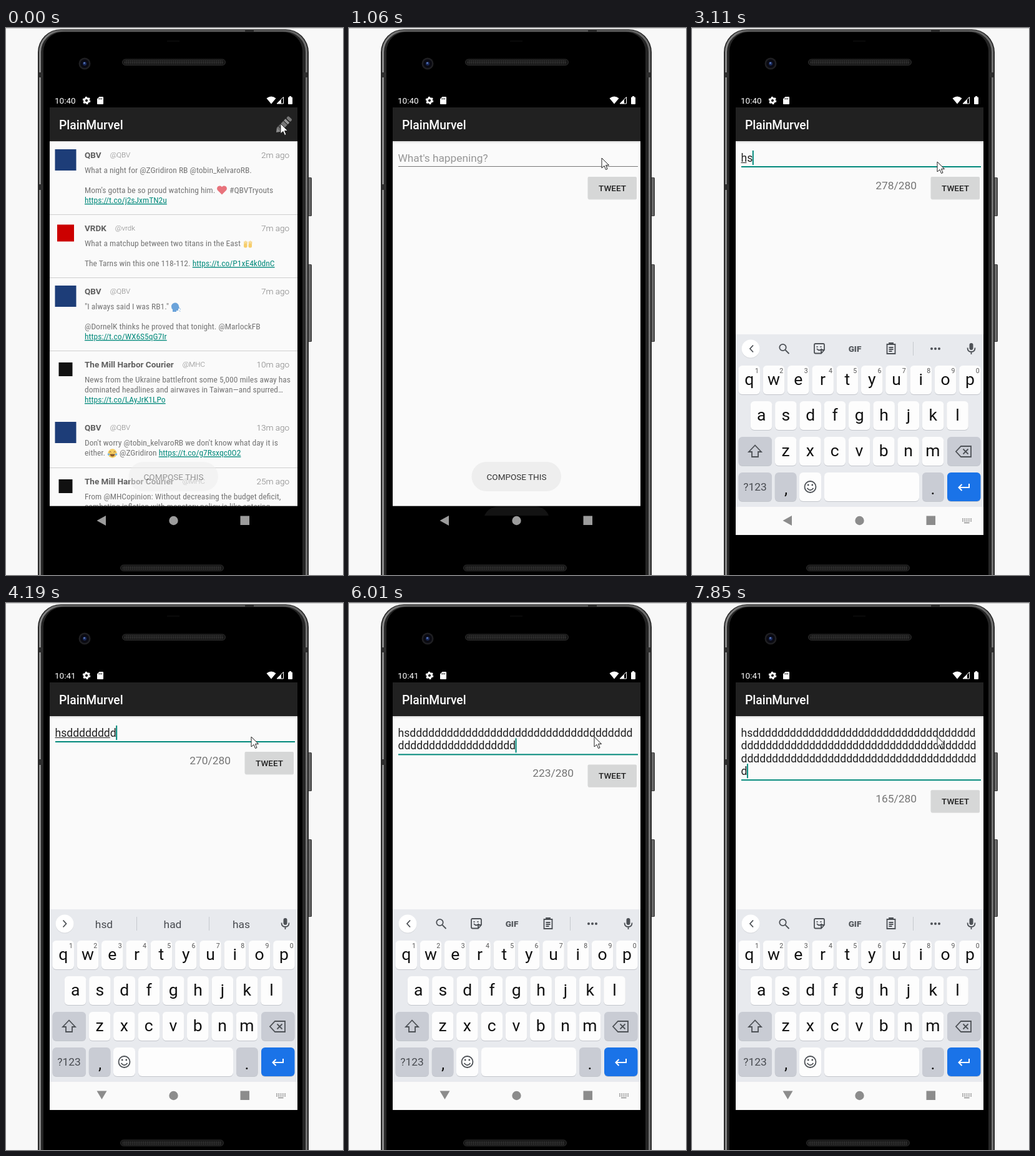
Write an HTML page that moves like this. It is 540 px wide and 875 px high and loops after 8 s.

```html
<!DOCTYPE html>
<html lang="en">
<head>
<meta charset="utf-8">
<title>Compose screen</title>
<style>
html, body { margin: 0; width: 100%; height: 100%; overflow: hidden; background: #f8f8f8; }
svg { display: block; width: 540px; height: 875px; }
text { font-family: Roboto, "Noto Sans", sans-serif; font-size: 13.52px; fill: #757575; }
.name { font-weight: 700; fill: #5f5f5f; }
.handle { font-weight: 300; font-size: 11.6px; fill: #858585; }
.ago { font-weight: 300; fill: #808080; text-anchor: end; }
.body { font-family: "Roboto Condensed", Roboto, sans-serif; font-stretch: 75%; font-variation-settings: "wdth" 75; }
.wide .body { font-size: 12.4px; letter-spacing: -.22px; }
.link { fill: #00897b; text-decoration: underline; }
.title { font-size: 19.3px; font-weight: 500; fill: #fff; }
.clock { fill: #fff; }
.hint { font-size: 17.3px; fill: #969696; }
.typed { font-size: 17.6px; fill: #212121; }
.count { font-size: 17.4px; text-anchor: end; }
.button { font-weight: 500; fill: #212121; text-anchor: middle; }
.key { font-size: 26.5px; fill: #111; text-anchor: middle; }
.digit { font-size: 10.5px; fill: #555; text-anchor: middle; }
.word { font-size: 17.4px; fill: #484b50; text-anchor: middle; }
.gif { font-size: 13.5px; font-weight: 900; fill: #55595e; text-anchor: middle; }
.icon { fill: none; stroke: #4d5156; stroke-width: 1.8; }
</style>
</head>
<body>
<svg id="stage" viewBox="0 0 540 875"></svg>
<script>
const LOOP = 8000;
const LINE = 20.4;
const PER_LINE = 38;
const MAX_WORD = 48;

const text = (x, y, s, cls) => `<text x="${x}" y="${y}" class="${cls}">${s}</text>`;
const rect = (x, y, w, h, fill, r = 0, more = '') =>
  `<rect x="${x}" y="${y}" width="${w}" height="${h}" rx="${r}" fill="${fill}" ${more}/>`;
const circle = (x, y, r, fill, more = '') => `<circle cx="${x}" cy="${y}" r="${r}" fill="${fill}" ${more}/>`;
const path = (d, fill, more = '') => `<path d="${d}" fill="${fill}" ${more}/>`;
const icon = d => `<path class="icon" d="${d}"/>`;
const group = (id, inner, more = '') => `<g id="${id}" ${more}>${inner}</g>`;
const link = id => `<tspan class="link">https://t.co/${id}</tspan>`;

// Phone body
function phone() {
  const grille = (x, y) => rect(x, y, 165, 9.5, '#161616', 4.75, 'stroke="#2e2e2e"') +
    rect(x + 3, y + 2, 159, 6, 'url(#dots)', 3);
  const side = (y, h) => rect(484, y, 6, h, '#3a3a3a', 1.5) + rect(485, y + 1, 3.5, h - 2, '#6a6a6a');
  const band = (x, y, w, h) => rect(x, y, w, h, '#2e2e2e');
  return rect(0, 0, 540, 1, '#cdcdcd') + side(239, 62) + side(378, 124) +
    rect(51, 2, 434, 920, '#262626', 37) +
    rect(54.5, 4.5, 427, 920, 'none', 34, 'stroke="url(#rim)" stroke-width="3"') +
    rect(60, 6.5, 415, 920, '#000', 31) +
    band(383, 2, 14, 4) + band(52, 71, 7, 8) + band(477, 71, 7, 8) + band(52, 250, 7, 9) +
    rect(258, 20.5, 20, 1, '#151515') + grille(186.5, 50) + grille(183.5, 859) +
    circle(126, 57, 9.5, '#1f1f22') + circle(126, 57, 7, '#0a0a12') +
    circle(126, 57, 3, '#1a2a5c') + circle(125.5, 56, 1.2, '#6d8fd0');
}

function statusBar() {
  return `<text id="clock" x="78" y="121" class="clock">10:40</text>` +
    circle(129, 116, 3.5, 'none', 'stroke="#fff" stroke-width="3"') +
    circle(129, 116, 5.3, 'none', 'stroke="#fff" stroke-width="2" stroke-dasharray="2.8 2.75"') +
    path('M149.5 110H155a1 1 0 0 1 1 1v10a1 1 0 0 1-1 1h-8a1 1 0 0 1-1-1v-7.5z', '#fff') +
    path('M149 112v2.5m2.2-2.5v2.5m2.2-2.5v2.5', 'none', 'stroke="#000" stroke-width=".9"') +
    path('M417.5 112.5q7.5-6 15 0l-7.5 9z', '#fff') +
    path('M444.5 110.5v10.5h-10.5z', 'none', 'stroke="#fff"') + path('M441 114v7h-7z', '#fff') +
    rect(452, 110.5, 7, 11.5, '#fff', 1) + rect(454, 109, 3, 2, '#fff');
}

const toolbar = () => rect(70, 127, 397, 54, '#212121') + text(85, 162, 'PlainMurvel', 'title');

function pen() {
  return `<g transform="translate(433 167) rotate(-46)">` +
    path('M0 0l6-4.5v9z', '#8c8c8c') + rect(6, -4.5, 15, 9, '#777') +
    rect(9, -4.5, 2, 9, '#444') + rect(22, -4.5, 4, 9, '#999') + rect(27.5, -4.5, 5, 9, '#777', 2) + `</g>`;
}

// Timeline
const BRANDS = {
  league: { name: 'QBV', handle: '@QBV', color: '#1d3d78', size: 34 },
  sports: { name: 'VRDK', handle: '@vrdk', color: '#cc0000', size: 27 },
  paper: { name: 'The Mill Harbor Courier', handle: '@MHC', color: '#111', size: 22 }
};

const heart = path('M346 266.5l-7-7a4.2 4.2 0 0 1 7-5.3 4.2 4.2 0 0 1 7 5.3z', '#e8737c');
const hands = rect(381, 344.5, 5.5, 7, '#f6cd6b', 2.5) + rect(388.5, 344.5, 5.5, 7, '#f6cd6b', 2.5) +
  path('M382 345v-3m2 3v-4m2 4v-3m3.500 3v-3m2 3v-4m2 4v-3', 'none',
    'stroke="#f6cd6b" stroke-width="1.4" stroke-linecap="round"');
const speaker = path('M265 446a6 6 0 0 1 12-1l1 3.5-2 .5v3h-3v2h-6v-4q-2-1-2-4z', '#6ba3da') +
  path('M278.5 449l1.5 1m-2 2l1 1.5', 'none', 'stroke="#6ba3da"');
const joy = circle(170.5, 680.5, 7.2, '#f7cf62') + path('M166.5 681.5h8q-.5 4-4 4t-4-4z', '#8a5c30') +
  path('M165.5 678.5q1.5-2 3 0m4 0q1.5-2 3 0', 'none', 'stroke="#8a5c30"') +
  circle(164.5, 682, 1.8, '#7ab8e8') + circle(176.5, 682, 1.8, '#7ab8e8');

const POSTS = [
  [181, 'league', '2m', [
    [126, 0, 'What a night for @ZGridiron RB @tobin_kelvaroRB.'],
    [126, 2, "Mom's gotta be so proud watching him."], [358, 2, '#QBVTryouts'],
    [126, 3, link('j2sJxmTN2u')]], heart],
  [298, 'sports', '7m', [
    [126, 0, 'What a matchup between two titans in the East'],
    [126, 2, 'The Tarns win this one 118-112. ' + link('P1xE4k0dnC')]], hands],
  [399, 'league', '7m', [
    [126, 0, '"I always said I was RB1."'],
    [126, 2, '@DornelK thinks he proved that tonight. @MarlockFB'],
    [126, 3, link('WX6S5qG7Ir')]], speaker],
  [516, 'paper', '10m', [
    [126, 0, 'News from the Ukraine battlefront some 5,000 miles away has'],
    [126, 1, 'dominated headlines and airwaves in Taiwan—and spurred…'],
    [126, 2, link('LAyJrK1LPo')]], ''],
  [617, 'league', '13m', [
    [126, 0, "Don't worry @tobin_kelvaroRB we don't know what day it is"],
    [126, 1, 'either.'], [182, 1, '@ZGridiron ' + link('g7Rsxqc0O2')]], joy],
  [703, 'paper', '25m', [
    [126, 0, 'From @MHCopinion: Without decreasing the budget deficit,'],
    [126, 1, 'combating inflation with monetary policy is like entering']], '']
];
const DIVIDERS = [181, 298, 399, 516, 703];

function post([top, kind, ago, lines, emoji]) {
  const { name, handle, color, size } = BRANDS[kind];
  return rect(95.5 - size / 2, top + 30 - size / 2, size, size, color) +
    text(126, top + 26.8, `${name}<tspan class="handle" dx="14" dy="-1">${handle}</tspan>`, 'name') +
    text(454, top + 26.8, ago + ' ago', 'ago') +
    lines.map(([x, row, s]) => text(x, top + 51.4 + row * 15.85, s, 'body')).join('') + emoji;
}

const feed = () => rect(70, 181, 397, 584, '#fafafa') +
  DIVIDERS.map(y => rect(70, y, 397, 1, '#cfcfcf')).join('') +
  POSTS.map(post).join('') + toolbar() + pen();

// Compose screen
function compose() {
  const rows = [0, 1, 2, 3].map(i => `<text class="typed" x="78.5" y="${214 + i * LINE}"></text>`).join('');
  return rect(70, 181, 397, 584, '#fafafa') + rect(70, 181, 397, 4, 'url(#drop)') + toolbar() +
    text(78.5, 214, "What's happening?", 'hint').replace('<text', '<text id="hint"') +
    group('rows', rows) + path('', 'none', 'id="marks" stroke="#212121"') +
    rect(78, 196, 2, 23, '#00897b', 0, 'id="caret"') +
    group('below', rect(79, 221, 384, 1, '#777', 0, 'id="rule"') +
      `<text id="count" class="count" x="360" y="258"></text>` +
      rect(383, 239, 78, 35.5, '#000', 2, 'opacity=".12"') + rect(382.5, 238, 78.5, 35.5, '#d6d7d7', 2) +
      text(422, 261, 'TWEET', 'button'));
}

// Keyboard
function keyboard() {
  const box = (x, y, w, fill = '#fdfdfd') => rect(x, y + 1, w, 46, '#c3c6cc', 6) + rect(x, y, w, 46, fill, 6);
  const row = (letters, x0, y, digits) => [...letters].map((c, i) => {
    const x = x0 + i * 39.3;
    return box(x, y, 34.6) + text(x + 17.3, y + 31, c, 'key') +
      (digits ? text(x + 29.6, y + 12, (i + 1) % 10, 'digit') : '');
  }).join('');
  const gray = '#c9ccd4';
  const divider = x => rect(x, 502, 1, 22, '#c6c9ce');

  const tools = icon('M98 507.5l-5 5.5 5 5.5') +
    circle(145.5, 511, 5.2, 'none', 'class="icon"') + icon('M149.5 515l6 6') +
    icon('M198 505h12q2 0 2 2v8l-5 5.5h-9q-2 0-2-2v-11.5q0-2 2-2zM212 515h-5v5M200 513q4 5 8 0M200.5 509v2m6-2v2') +
    text(261, 517.8, 'GIF', 'gif') +
    icon('M312.5 506h13v15h-13zM316 506v-2h6v2M315.5 511h7m-7 3h7m-7 3h5') + divider(354) +
    [384, 390, 396].map(x => circle(x, 513, 2, '#4d5156')).join('');
  const words = icon('M91.5 507.5l5 5.5-5 5.5') + divider(209) + divider(325) +
    text(157, 520, 'hsd', 'word') + text(267, 520, 'had', 'word') + text(377, 520, 'has', 'word');

  return rect(70, 490, 397, 276, '#e8eaee') + circle(94, 514, 14.5, '#d4d6da') + circle(94, 513, 14.5, '#fff') +
    group('tools', tools) + group('words', words) +
    rect(444.5, 504, 6, 11, '#4d5156', 3) + icon('M441.5 511.5q0 6.5 6 6.5t6-6.5M447.5 518v4') +
    row('qwertyuiop', 74.4, 540, true) + row('asdfghjkl', 93.8, 597) + row('zxcvbnm', 132.8, 654) +
    box(74.5, 654, 53.5, gray) + icon('M101 667.5l-10 10.5h5v8h10v-8h5z') +
    box(409, 654, 53.5, gray) + icon('M431 669h16v17h-16l-8-8.5zM434.5 673.5l8 8m0-8l-8 8') +
    box(74.5, 711, 53.5, gray) + text(101, 740, '?123', 'word') +
    box(132.8, 711, 34.6, gray) + text(150.5, 746, ',', 'key') +
    box(172, 711, 35) + circle(189.5, 734, 9, 'none', 'class="icon"') + icon('M184.5 736q5 6.5 10 0') +
    circle(186.2, 731, 1.4, '#4d5156') + circle(192.8, 731, 1.4, '#4d5156') +
    box(212, 711, 152) + box(369, 711, 34.6, gray) + text(386, 746, '.', 'key') +
    box(409, 711, 53.5, '#1a73e8') +
    path('M444 729v6h-16.5m5-5l-5 5 5 5', 'none', 'stroke="#fff" stroke-width="2"');
}

function navBar() {
  const keys = [785.5, 788.5].map(y => `M433 ${y}h15`).join('');
  return rect(70, 764.7, 397, 46.3, '#000', 0, 'id="navBg"') +
    path('M217 780q7-14.500 22-14.500h60q15 0 21 14.500z', '#131313', 'id="glow"') +
    `<g id="nav"><path id="back"/><circle cx="268.5" cy="788" r="7.2"/>` +
    `<rect x="375.5" y="780.5" width="14.5" height="14.5"/></g>` +
    group('imeKey', path(keys, 'none', 'stroke-width="1.8" stroke-dasharray="1.8 1.5"') +
      path('M436 791.5h8.5', 'none', 'stroke-width="1.5"'), 'stroke="#8f8f8f"');
}

const stage = document.getElementById('stage');
stage.innerHTML = `<defs>
  <linearGradient id="rim" gradientUnits="userSpaceOnUse" x1="51" x2="485" y1="0" y2="0">
    <stop offset="0" stop-color="#8e8e8e"/><stop offset=".1" stop-color="#5a5a5a"/>
    <stop offset=".9" stop-color="#5a5a5a"/><stop offset="1" stop-color="#747474"/>
  </linearGradient>
  <linearGradient id="drop" x2="0" y2="1">
    <stop offset="0" stop-color="#000" stop-opacity=".12"/><stop offset="1" stop-color="#000" stop-opacity="0"/>
  </linearGradient>
  <pattern id="dots" width="3" height="3" patternUnits="userSpaceOnUse"><circle cx="1.5" cy="1.5" r="1" fill="#444"/></pattern>
  <clipPath id="screen"><rect x="70" y="127" width="397" height="638"/></clipPath>
  <clipPath id="panel"><rect x="70" y="490" width="397" height="276"/></clipPath>
</defs>` + phone() + statusBar() +
  `<g clip-path="url(#screen)">${group('feed', feed())}${group('compose', compose())}</g>` +
  navBar() + `<g clip-path="url(#panel)">${group('keyboard', keyboard())}</g>` +
  group('toast', rect(196.5, 694, 143.5, 47, '#eeeeee', 23.5) +
    `<text x="268.5" y="723" text-anchor="middle" style="fill:#333">COMPOSE THIS</text>`) +
  group('cursor', path('M0 0V16L4 12.5L6.5 18.5L9 17.5L6.5 11.5H11.5Z', '#fff', 'stroke="#222"'));

const $ = id => document.getElementById(id);
const set = (id, attrs) => { for (const k in attrs) $(id).setAttribute(k, attrs[k]); };
const show = (id, on) => set(id, { visibility: on ? 'visible' : 'hidden' });

// Use a smaller size when no condensed face is installed
const sample = stage.querySelector('.body');
const narrow = sample.getComputedTextLength();
sample.setAttribute('class', '');
if (narrow > sample.getComputedTextLength() * 0.95) stage.classList.add('wide');
sample.setAttribute('class', 'body');

// Screen refresh times: [first, last, steps]
const REFRESH = [[0, 0, 1], [150, 1060, 7], [1210, 1720, 5], [2000, 2000, 1], [2280, 2280, 1], [2680, 2680, 1],
  [2970, 3260, 3], [3550, 4450, 7], [4600, 5590, 8], [5720, 6710, 8], [6850, 7850, 8]]
  .flatMap(([a, b, n]) => Array.from({ length: n }, (_, i) =>
    Math.floor((a + (b - a) * i / Math.max(1, n - 1)) / 10) * 10));

const TYPED = [[2960, 0], [2970, 1], [3110, 2], [3260, 3], [3550, 4], [4450, 13], [5170, 31],
  [5590, 45], [6710, 77], [7000, 85], [7850, 115]];
const TOAST = [[0, 0.5], [150, 1], [1210, 1], [1590, 0]];
const MOUSE_X = [[300, 440], [1060, 405], [1330, 393]];
const MOUSE_Y = [[300, 153], [1060, 208], [1330, 214]];

function track(points, t) {
  const i = points.findIndex(p => p[0] > t);
  if (i < 0) return points[points.length - 1][1];
  if (i === 0) return points[0][1];
  const [t0, a] = points[i - 1], [t1, b] = points[i];
  return a + (b - a) * (t - t0) / (t1 - t0);
}
const ease = p => 1 - (1 - Math.min(1, Math.max(0, p))) ** 2;

function drawInput(n, t) {
  const focused = t >= 1330;
  const full = 'hs'.slice(0, n) + 'd'.repeat(Math.max(0, n - 2));
  const last = Math.max(0, Math.ceil(n / PER_LINE) - 1);
  let caretX = 78.5, marks = '';
  [...$('rows').children].forEach((el, i) => {
    el.textContent = full.slice(i * PER_LINE, (i + 1) * PER_LINE);
    if (i > last || !n) return;
    const end = 78.5 + el.getComputedTextLength();
    if (i === last) caretX = end;
    const stop = i === last ? end - 9.9 : end;
    if (n <= MAX_WORD && stop > 79) marks += `M78.5 ${215.5 + i * LINE}H${stop}`;
  });
  set('marks', { d: marks });
  set('caret', { x: caretX - 0.5, y: 196 + last * LINE });
  show('caret', focused && (t < 2000 || t >= 2680));
  show('hint', !n);
  set('rule', focused ? { fill: '#00897b', height: 2 } : { fill: '#777', height: 1 });
  set('below', { transform: `translate(0 ${last * LINE})` });
  $('count').textContent = n ? `${280 - n}/280` : '';
}

function render(t) {
  const n = Math.round(track(TYPED, t));
  const open = ease((t - 150) / 430);
  set('compose', { opacity: open, transform: `translate(0 ${(1 - open) * 60})` });
  drawInput(n, t);

  const typing = t >= 2970;
  const rise = ease((t - 2880) / 230);
  show('keyboard', typing);
  set('keyboard', { transform: `translate(0 ${(1 - rise) * 120})` });
  const suggest = n >= 4 && n <= MAX_WORD;
  set('tools', { display: suggest ? 'none' : 'inline' });
  set('words', { display: suggest ? 'inline' : 'none' });

  set('navBg', { fill: typing ? '#fafafa' : '#000' });
  set('nav', { fill: typing ? '#8c8c8c' : '#9c9c9c' });
  set('back', { d: t >= 3260 ? 'M145.5 780.5h16l-8 13.5z' : 'M160 780v16l-14.5-8z' });
  show('glow', t >= 300 && t < 1720);
  show('imeKey', t >= 2280);

  set('toast', { opacity: track(TOAST, t) });
  set('cursor', { transform: `translate(${track(MOUSE_X, t)} ${track(MOUSE_Y, t)})` });
  $('clock').textContent = t >= 4000 ? '10:41' : '10:40';
}

const start = performance.now();
let shown = -1;
function tick() {
  const now = (performance.now() - start) % LOOP;
  const t = REFRESH.filter(r => r <= now).pop();
  if (t !== shown) render(shown = t);
  requestAnimationFrame(tick);
}
tick();
</script>
</body>
</html>
```
